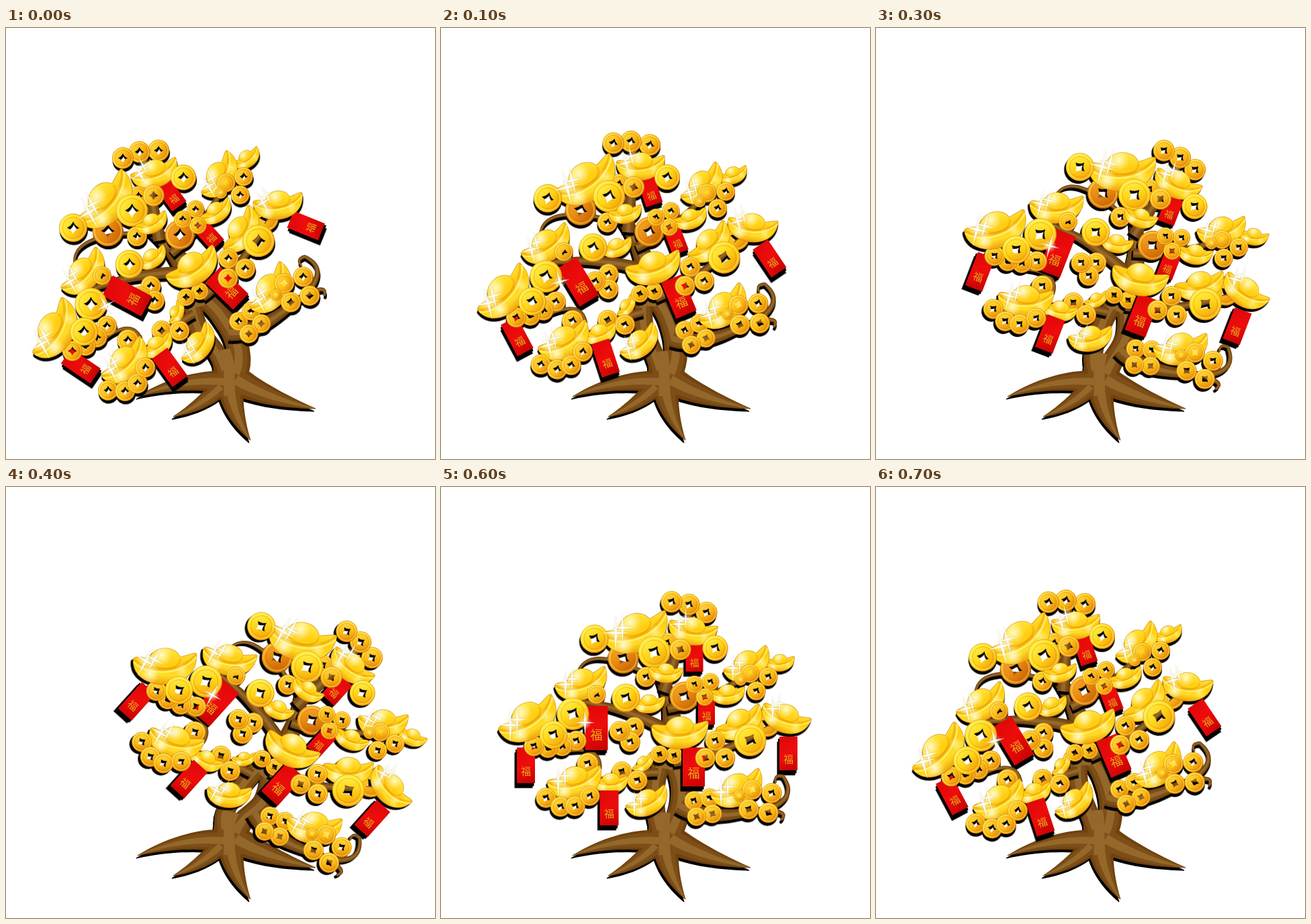
An HTML page with a canvas for the animation above (800 ms loop, 639 px wide and 642 px high).

```html
<!DOCTYPE html>
<html lang="zh">
<head>
<meta charset="utf-8">
<title>Money tree</title>
<style>
html, body { margin: 0; width: 100%; height: 100%; overflow: hidden; background: #fff; }
canvas { display: block; }
</style>
</head>
<body>
<canvas id="stage" width="639" height="642"></canvas>
<script>
const W = 639, H = 642, STEP = 100, TILT = 14.5;
const PIVOT = { x: 320, y: 515 };
const out = document.getElementById('stage').getContext('2d');
const layer = document.createElement('canvas');
layer.width = W;
layer.height = H;
const g = layer.getContext('2d');
const rad = d => d * Math.PI / 180;

let lean = 0;      // whole steps of tilt, -2 (left) to 2 (right)
let sparks = [];

const angle = () => rad(TILT * lean);
const lift = () => -4.9 * Math.abs(lean);

function turn(x, y, a) {
  return [x * Math.cos(a) - y * Math.sin(a), x * Math.sin(a) + y * Math.cos(a)];
}

function sway(c) {
  c.translate(PIVOT.x + 1.5, PIVOT.y + lift());
  c.rotate(angle());
  c.translate(-PIVOT.x, -PIVOT.y);
}

// The trunk follows the crown gradually; the roots stay put.
function bend(x, y) {
  const k = Math.min(1, Math.max(0, (520 - y) / 70));
  const w = k * k * (3 - 2 * k);
  const [u, v] = turn(x - PIVOT.x, y - PIVOT.y, angle());
  return [x + (PIVOT.x + 1.5 + u - x) * w, y + (PIVOT.y + lift() + v - y) * w];
}
const stiff = (x, y) => [x, y];

// A tapering piece of wood along a quadratic curve.
function limb([x0, y0, cx, cy, x1, y1, w0, w1], place, k) {
  const a = [], b = [];
  for (let i = 0; i <= 16; i++) {
    const t = i / 16, s = 1 - t;
    const x = s * s * x0 + 2 * s * t * cx + t * t * x1;
    const y = s * s * y0 + 2 * s * t * cy + t * t * y1;
    const dx = s * (cx - x0) + t * (x1 - cx), dy = s * (cy - y0) + t * (y1 - cy);
    const r = k * (w0 + (w1 - w0) * t ** 1.5) / 2 / Math.hypot(dx, dy);
    a.push(place(x - dy * r, y + dx * r));
    b.unshift(place(x + dy * r, y - dx * r));
  }
  g.beginPath();
  [...a, ...b].forEach(p => g.lineTo(...p));
  g.closePath();
  g.fill();
}

function wood(limbs, place) {
  const layers = [[1, '#6f420f'], [0.74, '#7d4e17'], [0.34, '#94682a']];
  for (const [k, color] of layers) {
    g.fillStyle = color;
    limbs.forEach(l => limb(l, place, k));
  }
}

const trunk = [
  [328, 285, 354, 350, 335, 420, 20, 46],
  [328, 405, 307, 455, 326, 510, 30, 28],
  [342, 405, 372, 455, 342, 515, 30, 36],
  [333, 485, 332, 510, 333, 548, 46, 50],
  [326, 527, 262, 522, 196, 549, 32, 1],
  [320, 534, 292, 562, 249, 579, 28, 1],
  [334, 535, 338, 575, 364, 614, 38, 1],
  [342, 524, 385, 550, 461, 567, 42, 1]
];
const branches = [
  [340, 365, 280, 330, 210, 320, 18, 8],
  [305, 278, 222, 236, 204, 272, 6, 4],
  [330, 305, 352, 240, 372, 182, 18, 7],
  [336, 330, 400, 320, 465, 272, 14, 6],
  [345, 410, 420, 400, 500, 350, 14, 6],
  [322, 425, 250, 425, 170, 462, 13, 6],
  [235, 420, 238, 380, 172, 397, 6, 4],
  [354, 474, 390, 500, 480, 480, 26, 9],
  [470, 484, 534, 468, 508, 431, 9, 5],
  [509, 431, 494, 427, 497, 441, 5, 3],
  [485, 482, 518, 483, 505, 496, 7, 4]
];

const tones = {
  bright: ['#fff14e', '#ffd418', '#f2a00a'],
  gold: ['#ffdc48', '#fdbd18', '#e38a0a'],
  dark: ['#f6a82c', '#e8880f', '#c66206']
};

function hole(r) {
  for (let i = 0; i <= 4; i++) {
    const a = 0.52 + i * Math.PI / 2;
    const tip = turn(r, 0, a);
    if (i) g.quadraticCurveTo(...turn(r * 0.4, 0, a - Math.PI / 4), ...tip);
    else g.moveTo(...tip);
  }
}

function coin(tone, x, y, r) {
  const [light, base, edge] = tones[tone];
  g.save();
  g.translate(x, y);
  const fill = g.createLinearGradient(-r * 0.6, -r * 0.8, r * 0.6, r * 0.8);
  fill.addColorStop(0, light);
  fill.addColorStop(0.5, base);
  fill.addColorStop(1, edge);
  g.beginPath();
  g.arc(0, 0, r, 0, 7);
  g.closePath();
  hole(r * 0.44);
  g.fillStyle = fill;
  g.fill('evenodd');
  const ring = (k, w, color) => {
    g.beginPath();
    g.arc(0, 0, r * k, 0, 7);
    g.lineWidth = w;
    g.strokeStyle = color;
    g.stroke();
  };
  ring(0.98, 0.8, 'rgba(190,105,0,.5)');
  ring(0.87, r * 0.09, 'rgba(255,238,95,.45)');
  ring(0.74, 0.9, 'rgba(205,120,0,.4)');
  g.restore();
}

// n coins evenly around a centre
function heap(tone, x, y, n, spread, start, r) {
  for (let i = 0; i < n; i++) {
    const [dx, dy] = turn(spread, 0, rad(start + i * 360 / n));
    coin(tone, x + dx, y + dy, r);
  }
}

// n coins from one place to another along a sagging line
function row(tone, x0, y0, x1, y1, n, sag, r) {
  for (let i = 0; i < n; i++) {
    const t = i / (n - 1);
    coin(tone, x0 + (x1 - x0) * t, y0 + (y1 - y0) * t + 4 * sag * t * (1 - t), r);
  }
}

function glow(c, x, y, r, alpha) {
  const s = c.createRadialGradient(x, y, 0, x, y, r);
  s.addColorStop(0, `rgba(255,255,232,${alpha})`);
  s.addColorStop(1, 'rgba(255,255,200,0)');
  c.fillStyle = s;
  c.fillRect(x - r, y - r, r * 2, r * 2);
}

function ingot(x, y, half, deg) {
  g.save();
  g.translate(x, y);
  g.rotate(rad(deg));
  g.scale(half, half * 1.1);
  g.beginPath();
  g.moveTo(-1, -0.14);
  g.bezierCurveTo(-1.04, 0.3, -0.6, 0.57, -0.06, 0.57);
  g.bezierCurveTo(0.52, 0.57, 1.06, 0.25, 1, -0.34);
  g.bezierCurveTo(0.97, -0.42, 0.75, -0.3, 0.48, -0.24);
  g.bezierCurveTo(0.34, -0.56, -0.32, -0.58, -0.5, -0.18);
  g.bezierCurveTo(-0.68, -0.17, -0.93, -0.24, -1, -0.14);
  g.closePath();
  const fill = g.createLinearGradient(0, -0.5, 0, 0.58);
  fill.addColorStop(0, '#ffe944');
  fill.addColorStop(0.42, '#ffcd10');
  fill.addColorStop(0.75, '#ffdb28');
  fill.addColorStop(1, '#ee9f08');
  g.fillStyle = fill;
  g.fill();
  g.lineWidth = 1 / half;
  g.strokeStyle = 'rgba(205,120,0,.55)';
  g.stroke();
  g.clip();
  const rim = (color, w, dy) => {
    g.beginPath();
    g.moveTo(-1, -0.16 + dy);
    g.bezierCurveTo(-0.6, 0.22 + dy, 0.5, 0.24 + dy, 1, -0.36 + dy);
    g.strokeStyle = color;
    g.lineWidth = w;
    g.stroke();
  };
  rim('rgba(236,148,0,.45)', 0.1, 0.03);
  rim('rgba(255,244,110,.8)', 0.06, 0.1);
  g.beginPath();
  g.ellipse(0, -0.14, 0.48, 0.25, 0, -0.2, Math.PI);
  g.strokeStyle = 'rgba(232,142,0,.35)';
  g.lineWidth = 0.06;
  g.stroke();
  glow(g, -0.1, -0.27, 0.32, 0.85);
  glow(g, -0.45, 0.27, 0.3, 0.85);
  glow(g, 0.55, 0.15, 0.22, 0.5);
  g.restore();
}

// An ingot with two sparkles on its left rim
function shiny(x, y, half, deg) {
  ingot(x, y, half, deg);
  const [dx, dy] = turn(-0.6 * half, -0.1 * half, rad(deg));
  const size = Math.max(20, half * 0.55);
  sparks.push([x + dx, y + dy, size], [x + dx + 10, y + dy - 8, size * 0.8]);
}

// Hangs from its top edge; swings further to the left by its own amount.
function envelope(x, y, w, h, swing) {
  const deg = lean * (lean < 0 ? swing : 21);
  g.save();
  g.translate(x, y);
  g.rotate(rad(deg) - angle());
  g.fillStyle = '#000';
  g.fillRect(-w / 2 - 2, 3, w, h);
  const fill = g.createLinearGradient(-w / 2, 0, w / 2, h);
  fill.addColorStop(0, '#de0808');
  fill.addColorStop(0.5, '#ee0c0c');
  fill.addColorStop(1, '#c40202');
  g.fillStyle = fill;
  g.fillRect(-w / 2, 0, w, h);
  g.fillStyle = '#e8a91c';
  g.font = `500 ${Math.round(w * 0.54)}px "Noto Sans CJK SC", "Noto Sans CJK", sans-serif`;
  g.textAlign = 'center';
  g.textBaseline = 'middle';
  g.fillText('福', 0, h * 0.66);
  g.restore();
}

function crownTop() {
  row('gold', 394, 187, 342, 171, 3, -4, 16);
  coin('dark', 270, 255, 23);
  row('gold', 304, 283, 335, 232, 2, 0, 15);
  envelope(376, 235, 26, 40, 18);
  shiny(373, 213, 36, 14);
  coin('bright', 407, 240, 19);
  shiny(289, 215, 50, -14);
  coin('bright', 227, 226, 21);
  coin('bright', 316, 246, 24);
  coin('gold', 355, 242, 16);
}

function middle() {
  ingot(308, 322, 24, 0);
  coin('dark', 361, 312, 22);
  heap('gold', 277, 367, 3, 13, -45, 15);
  ingot(333, 276, 25, 8);
  envelope(394, 314, 25, 40, 21);
  ingot(425, 308, 26, 0);
  heap('gold', 389, 299, 3, 14, -39, 13);
  coin('bright', 274, 314, 21);
}

function rightSide() {
  ingot(503, 261, 22, 0);
  shiny(455, 264, 37, -24);
  heap('gold', 471, 288, 3, 16, -20, 14);
  coin('gold', 445, 287, 9);
  envelope(516, 372, 27, 50, 34);
  coin('gold', 484, 352, 20);
  shiny(511, 343, 37, 25);
  ingot(444, 351, 37, -24);
  coin('bright', 459, 377, 24);
}

function leftSide() {
  envelope(230, 326, 34, 66, 31);
  shiny(208, 292, 40, -14);
  coin('gold', 230, 309, 14);
  envelope(125, 388, 27, 53, 28);
  row('gold', 200, 378, 137, 386, 4, 6, 15);
  shiny(129, 346, 47, -27);
  coin('bright', 195, 338, 24);
  coin('bright', 166, 369, 21);
  sparks.push([213, 351, 20]);
}

function centre() {
  ingot(300, 411, 18, -35);
  row('gold', 346, 400, 324, 398, 2, 0, 13);
  envelope(375, 388, 33, 58, 23);
  ingot(354, 364, 42, 2);
  heap('gold', 407, 395, 3, 17, -90, 15);
}

function lowLeft() {
  coin('gold', 217, 412, 16);
  row('gold', 268, 424, 291, 437, 2, 0, 15);
  ingot(251, 440, 26, 2);
  envelope(249, 452, 28, 52, 18);
  shiny(198, 438, 41, -10);
  row('gold', 155, 463, 220, 460, 4, 16, 15);
  shiny(306, 468, 33, -22);
}

function lowRight() {
  heap('gold', 389, 477, 4, 17, -145, 14);
  shiny(440, 449, 41, -22);
  heap('gold', 474, 468, 4, 21, -125, 15);
  coin('gold', 443, 460, 9);
}

function star([x, y, len]) {
  const arm = (a, b) => {
    out.beginPath();
    out.moveTo(0, -b);
    for (const [px, py] of [[a, 0], [0, b], [-a, 0], [0, -b]]) out.lineTo(px, py);
    out.fill();
  };
  out.save();
  out.translate(x, y);
  glow(out, 0, 0, len * 0.5, 0.8);
  out.shadowColor = 'rgba(150,125,80,.4)';
  out.shadowBlur = 2;
  out.fillStyle = 'rgba(255,255,248,.95)';
  arm(len * 0.09, len);
  arm(len * 0.75, len * 0.08);
  out.restore();
}

// Puts the layer on the stage with a hard black shadow.
function stamp(dx, dy) {
  out.save();
  out.shadowColor = '#000';
  out.shadowOffsetX = dx;
  out.shadowOffsetY = dy;
  out.drawImage(layer, 0, 0);
  out.restore();
  g.clearRect(0, 0, W, H);
}

function draw() {
  sparks = [];
  out.clearRect(0, 0, W, H);
  wood(trunk, bend);
  stamp(-2, 4);
  g.save();
  sway(g);
  wood(branches, stiff);
  for (const part of [crownTop, middle, rightSide, leftSide, centre, lowLeft, lowRight]) part();
  g.restore();
  stamp(...turn(-1.5, 4.5, angle()));
  out.save();
  sway(out);
  sparks.forEach(star);
  out.restore();
}

let shown = -1;
function tick(now) {
  const i = Math.floor(now / STEP) % 8;
  if (i !== shown) {
    shown = i;
    lean = 2 - Math.abs(4 - i);
    draw();
  }
  requestAnimationFrame(tick);
}
tick(0);
</script>
</body>
</html>
```
